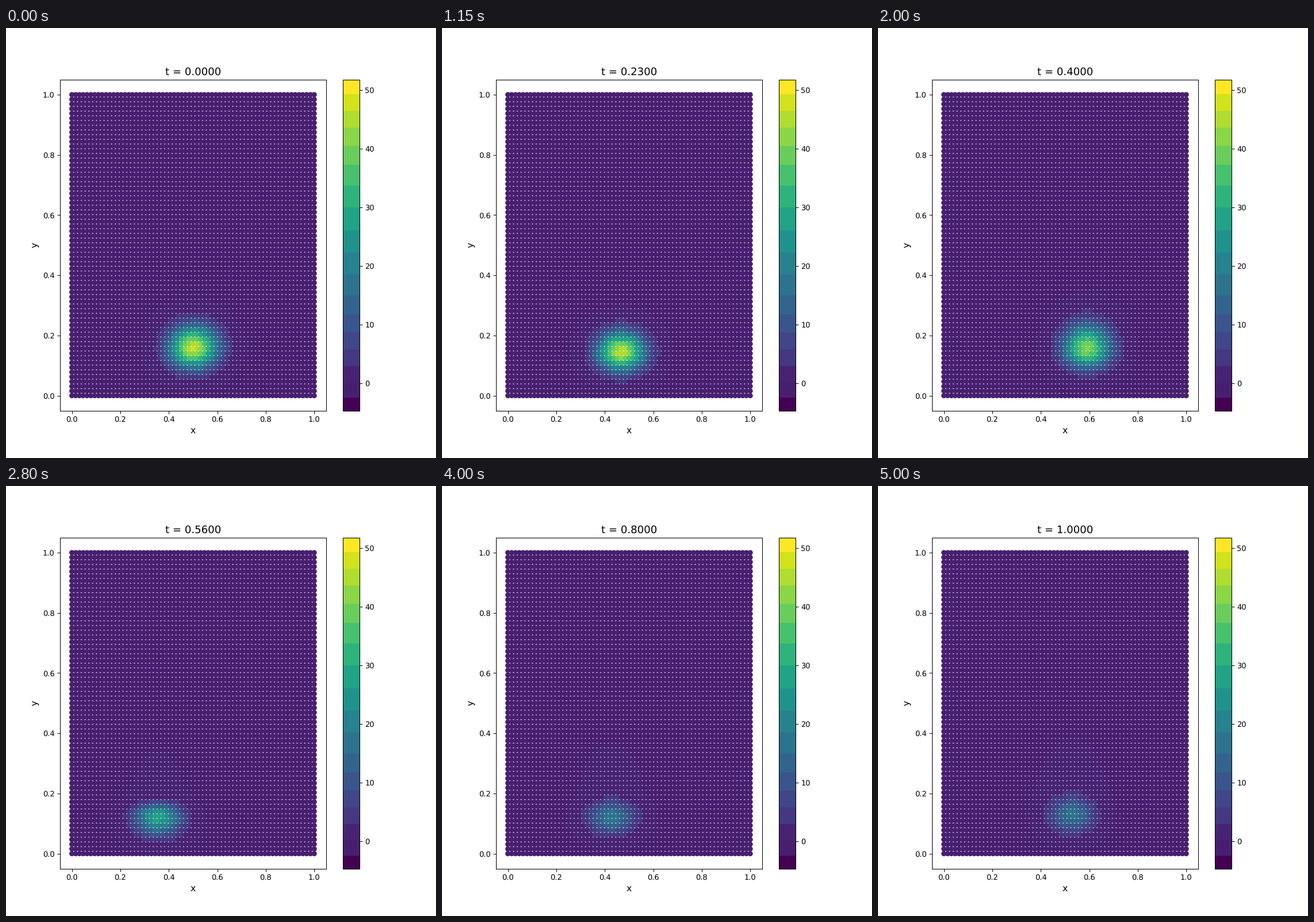
A matplotlib script for the animation above (5050 ms loop, 748x748 px).

```python
import numpy as np
import matplotlib.pyplot as plt
from matplotlib.animation import FuncAnimation
from matplotlib.colors import BoundaryNorm, ListedColormap

plt.rcParams["text.hinting"] = "no_hinting"

FRAMES, INTERVAL = 101, 50
VMIN, VMAX = -4.7, 51.8
viridis = plt.get_cmap("viridis")


def shade(value):
    return viridis((value - VMIN) / (VMAX - VMIN))


# Colour bands, slightly wider around the middle of the scale.
step = np.arange(15)
upper = 2.95 + 3.31 * step - 1.2 * np.sin(2 * np.pi * step / 14)
edges = np.concatenate([[VMIN, -2.45, 0.25], upper, [VMAX]])
colors = shade((edges[:-1] + edges[1:]) / 2)
colors[:3] = shade(np.array([VMIN, 0, 0.8]))
colors[-1] = shade(VMAX)
cmap = ListedColormap(colors)
norm = BoundaryNorm(edges, cmap.N)


def bell(d, width):
    return np.exp(-0.5 * (d / width) ** 2)


axis = np.linspace(0, 1, 65)
X, Y = (g.ravel() for g in np.meshgrid(axis, axis))


def field(t):
    # Sideways swing that builds up until t = 0.5, then dies away.
    swing = 0.245 * bell(t - 0.5, 0.17 if t < 0.5 else 0.247)
    dx = swing * np.cos(2 * np.pi * (t - 0.34) / 0.34)

    # The blob fades mid-way and is briefly lifted near t = 0.68.
    lift = bell(t - 0.68, 0.042)
    peak = 16 + 31 / (1 + np.exp((t - 0.52) / 0.09)) - 12 * lift
    cx = 0.5 + dx
    cy = 0.158 - 0.035 * t + 0.12 * dx + 0.08 * lift
    up = 0.05 - 0.012 * t + 0.1 * dx + 0.014 * lift
    down = 0.045 - 0.008 * t + 0.02 * lift

    blob = peak * bell(X - cx, 0.068 - 0.005 * t)
    blob *= bell(Y - cy, np.where(Y > cy, up, down))

    # Thin haze left above the blob.
    dy = Y - cy - 0.1
    haze = 0.8 * t * bell(X - cx, 0.09)
    haze *= bell(dy, np.where(dy > 0, 0.1 + 0.35 * lift, 0.1))
    return np.clip(blob + haze, 0, VMAX - 0.01)


fig, ax = plt.subplots(figsize=(8, 8), dpi=93.5)
dots = ax.scatter(X, Y, c=field(0), cmap=cmap, norm=norm)
bar = fig.colorbar(dots, ax=ax, spacing="proportional",
                   ticks=range(0, 51, 10))
bar.minorticks_off()
ax.set_xlabel("x", fontsize=12)
ax.set_ylabel("y", fontsize=12)
title = ax.set_title("t = 0.0000", fontsize=14)


def update(i):
    t = i / (FRAMES - 1)
    dots.set_array(field(t))
    title.set_text(f"t = {t:.4f}")
    return dots, title


anim = FuncAnimation(fig, update, frames=FRAMES, interval=INTERVAL,
                     repeat=True, repeat_delay=0)
plt.show()
```
